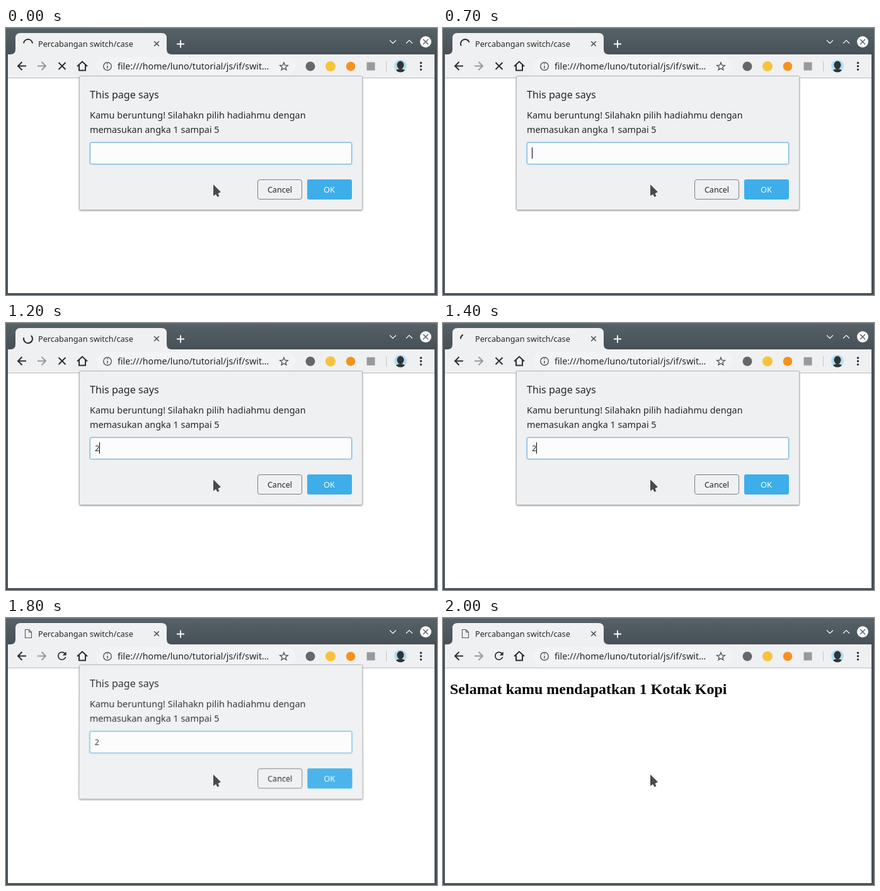
An HTML page for the animation above (3.7 s loop, 684x425 px).

```html
<!DOCTYPE html>
<html lang="id">
<head>
<meta charset="utf-8">
<title>Percabangan switch/case</title>
<style>
html, body { margin: 0; width: 100%; height: 100%; overflow: hidden; background: #fff; }
svg { position: absolute; left: 0; top: 0; width: 684px; height: 425px; }
text { font-family: "Noto Sans", sans-serif; fill: #232629; white-space: pre; }
.line { fill: none; stroke: #2b2e31; stroke-width: 2; }
#dialog { transform-origin: 341px 77px; }
#heading { font: bold 24px "Liberation Serif", "Times New Roman", serif; fill: #000; }
</style>
</head>
<body>
<svg viewBox="0 0 684 425">
  <defs>
    <linearGradient id="bar" x1="0" y1="0" x2="0" y2="1">
      <stop offset="0" stop-color="#566168"/>
      <stop offset="1" stop-color="#475057"/>
    </linearGradient>
    <clipPath id="face"><circle cx="626" cy="60.5" r="10"/></clipPath>
  </defs>

  <!-- window frame -->
  <rect width="684" height="425" fill="#475057"/>
  <rect width="684" height="42" fill="url(#bar)"/>
  <rect width="684" height="1" fill="#6a747b"/>
  <rect x="3" y="80" width="677" height="342" fill="#fff"/>
  <rect x="3" y="42" width="677" height="38" fill="#eff0f1"/>
  <rect x="3" y="79" width="677" height="1" fill="#b8babc"/>
  <path d="M7 42q8 0 8-8V16q0-8 8-8H247q8 0 8 8V34q0 8 8 8z" fill="#eff0f1"/>

  <!-- tab strip -->
  <path id="spinner" class="line" stroke-linecap="round"/>
  <path id="doc" class="line" style="stroke:#55585b;stroke-width:1.1" d="M30.5 18.5H36.5L40.5 22.5V31.5H30.5zM36.5 18.5V22.5H40.5"/>
  <text x="51" y="30" font-size="12.7">Percabangan switch/case</text>
  <path class="line" style="stroke:#4b4e51;stroke-width:1.6" d="M235.2 21.2l7.6 7.6m0-7.6l-7.6 7.6"/>
  <path class="line" style="stroke:#fff" d="M271 25.5h12m-6-6v12"/>
  <path class="line" style="stroke:#fcfcfc;stroke-width:1.1" d="M609 19.5l5 5 5-5M635 24.5l5-5 5 5"/>
  <circle cx="666" cy="22" r="9" fill="#fcfcfc"/>
  <path class="line" style="stroke:#475057;stroke-width:1.1" d="M662 18l8 8m0-8l-8 8"/>

  <!-- toolbar -->
  <path class="line" d="M32 60.5H19.5M25.5 54l-6.5 6.5 6.5 6.5"/>
  <path class="line" style="stroke:#96999b" d="M50 60.5H62.5M56.500 54l6.500 6.500-6.500 6.500"/>
  <path id="stop" class="line" d="M83.500 55l11 11m0-11l-11 11"/>
  <path id="reload" transform="translate(78.500 50) scale(.86)" fill="#2b2e31" d="M17.650 6.350C16.200 4.900 14.200 4 12 4a8 8 0 1 0 7.730 10h-2.080A6 6 0 1 1 16.220 7.780L13 11h7V4z"/>
  <path class="line" d="M113 61l8-7.500 8 7.500M116 59v8.500h10V59"/>
  <rect x="143" y="46" width="317" height="29" rx="14.500" fill="#f2f3f4"/>
  <circle class="line" style="stroke:#55585b;stroke-width:1.400" cx="161" cy="61" r="6.300"/>
  <path class="line" style="stroke:#55585b;stroke-width:1.500" d="M161 60v4.500m0-8v1.600"/>
  <text x="177" y="66" font-size="14.2">file:///home/luno/tutorial/js/if/swit…</text>
  <path id="star" class="line" style="stroke:#55585b;stroke-width:1.400"/>
  <circle cx="483" cy="61" r="7.500" fill="#65686a"/>
  <circle cx="515" cy="61" r="8" fill="#f8c33c"/>
  <circle cx="547" cy="61" r="7.300" fill="#f5921e"/>
  <rect x="572.500" y="54.500" width="13" height="13" fill="#97999b"/>
  <rect x="603" y="53" width="1" height="16" fill="#c3c5c7"/>
  <g clip-path="url(#face)">
    <rect x="616" y="50" width="20" height="21" fill="#b3dff0"/>
    <path d="M617 72q1-7 9-7t9 7z" fill="#2f3439"/>
    <ellipse cx="626" cy="59" rx="5.500" ry="6.500" fill="#2f3439"/>
  </g>
  <g fill="#2b2e31">
    <circle cx="658.500" cy="55.500" r="1.700"/><circle cx="658.500" cy="60.800" r="1.700"/><circle cx="658.500" cy="66.100" r="1.700"/>
  </g>

  <text id="heading" x="11" y="121">Selamat kamu mendapatkan 1 Kotak Kopi</text>
</svg>

<svg id="dialog" viewBox="0 0 684 425">
  <defs>
    <filter id="shadow" x="-5%" y="-5%" width="110%" height="112%">
      <feDropShadow dx="0" dy="1" stdDeviation="1.300" flood-color="#000" flood-opacity=".4"/>
    </filter>
  </defs>
  <rect x="116.500" y="76.500" width="449" height="213" rx="2" fill="#eff0f1" stroke="#b4b6b8" filter="url(#shadow)"/>
  <text x="133" y="112" font-size="16.100">This page says</text>
  <g font-size="14.400">
    <text x="133" y="144" letter-spacing=".04">Kamu beruntung! Silahakn pilih hadiahmu dengan</text>
    <text x="133" y="167">memasukan angka 1 sampai 5</text>
  </g>
  <rect x="133" y="182" width="416" height="35" rx="3" fill="#fcfcfc" stroke="#c0dfee" stroke-width="2.400"/>
  <rect x="133.500" y="182.500" width="415" height="34" rx="2.500" fill="#fcfcfc" stroke="#78b7d6"/>
  <g font-size="12.800">
    <text id="entry" x="141" y="204">2</text>
    <rect id="caret" y="190" width="1" height="18" fill="#000"/>
    <rect x="399.500" y="241.500" width="70" height="31" rx="3.500" fill="#eff0f1" stroke="#7b7e81"/>
    <text x="434.500" y="262" text-anchor="middle" font-size="12.600">Cancel</text>
    <rect x="478" y="241" width="71" height="32" rx="3" fill="#3daee9"/>
    <text x="513" y="262" text-anchor="middle" style="fill:#fcfcfc">OK</text>
  </g>
</svg>

<svg viewBox="0 0 684 425">
  <path d="M329 249V267.500L333 264.500 335.500 269 338.500 267.500 336.500 263.500 341 261z" fill="#484a4c" stroke="#fff" stroke-width="1.200" stroke-linejoin="round" paint-order="stroke"/>
</svg>

<script>
const LOOP = 3700, STEP = 100, ARC = 666, MAX = 270;
const $ = id => document.getElementById(id);
const show = (id, on) => $(id).style.display = on ? '' : 'none';

function polar(cx, cy, r, deg) {
  const a = deg * Math.PI / 180;
  return `${(cx + r * Math.cos(a)).toFixed(2)} ${(cy + r * Math.sin(a)).toFixed(2)}`;
}

// cubic-bezier(.4, 0, .2, 1)
function ease(x) {
  let lo = 0, hi = 1, s = .5;
  for (let i = 0; i < 24; i++) {
    s = (lo + hi) / 2;
    const q = 1 - s;
    if (1.2 * q * q * s + .6 * q * s * s + s * s * s < x) lo = s; else hi = s;
  }
  return s * s * (3 - 2 * s);
}

// Steady rotation while the arc shrinks to a dot and grows again.
function spinnerPath(t) {
  const e = (t - 1700) * 1.05 + 5 * ARC;
  const phase = Math.floor(e / ARC);
  let sweep = MAX * ease(e / ARC - phase);
  if (phase % 2 === 0) sweep -= MAX;
  if (Math.abs(sweep) < 5) sweep = sweep < 0 ? -5 : 5;
  const turn = Math.floor(e / (2 * ARC)) - 2;
  const start = 309 + 360 * (t - 1700) * 1.05 / 1568 + turn * MAX;
  const large = Math.abs(sweep) > 180 ? 1 : 0;
  return `M${polar(35, 25, 7, start)}A7 7 0 ${large} ${sweep > 0 ? 1 : 0} ${polar(35, 25, 7, start + sweep)}`;
}

function render(time) {
  const t = Math.floor(time % LOOP / STEP) * STEP;
  const loading = t < 1800, typed = t >= 1100;

  show('spinner', loading);
  show('stop', loading);
  show('doc', !loading);
  show('reload', !loading);
  if (loading) $('spinner').setAttribute('d', spinnerPath(t));

  show('entry', typed);
  show('caret', t >= 400 && t < 900 || typed && t < 1600);
  $('caret').setAttribute('x', typed ? 148 : 141);

  // The closing dialog lifts and tilts as it fades.
  const lift = t < 1800 ? 0 : t < 1900 ? 2 : 14;
  const tilt = -lift * 6.6e-6;
  $('dialog').style.transform = lift ? `matrix3d(1,0,0,0, 0,1,0,${tilt.toFixed(8)}, 0,0,1,0, 0,${-lift},0,1)` : 'none';
  $('dialog').style.opacity = t < 1800 ? 1 : t < 1900 ? .93 : .48;
  show('dialog', t < 2000);
  show('heading', t >= 1900);
}

const tips = Array.from({ length: 10 }, (_, i) => polar(441, 61.5, i % 2 ? 2.9 : 6.6, i * 36 - 90));
$('star').setAttribute('d', `M${tips.join('L')}z`);

const began = performance.now();
function tick() {
  render(performance.now() - began);
  requestAnimationFrame(tick);
}
tick();
</script>
</body>
</html>
```
